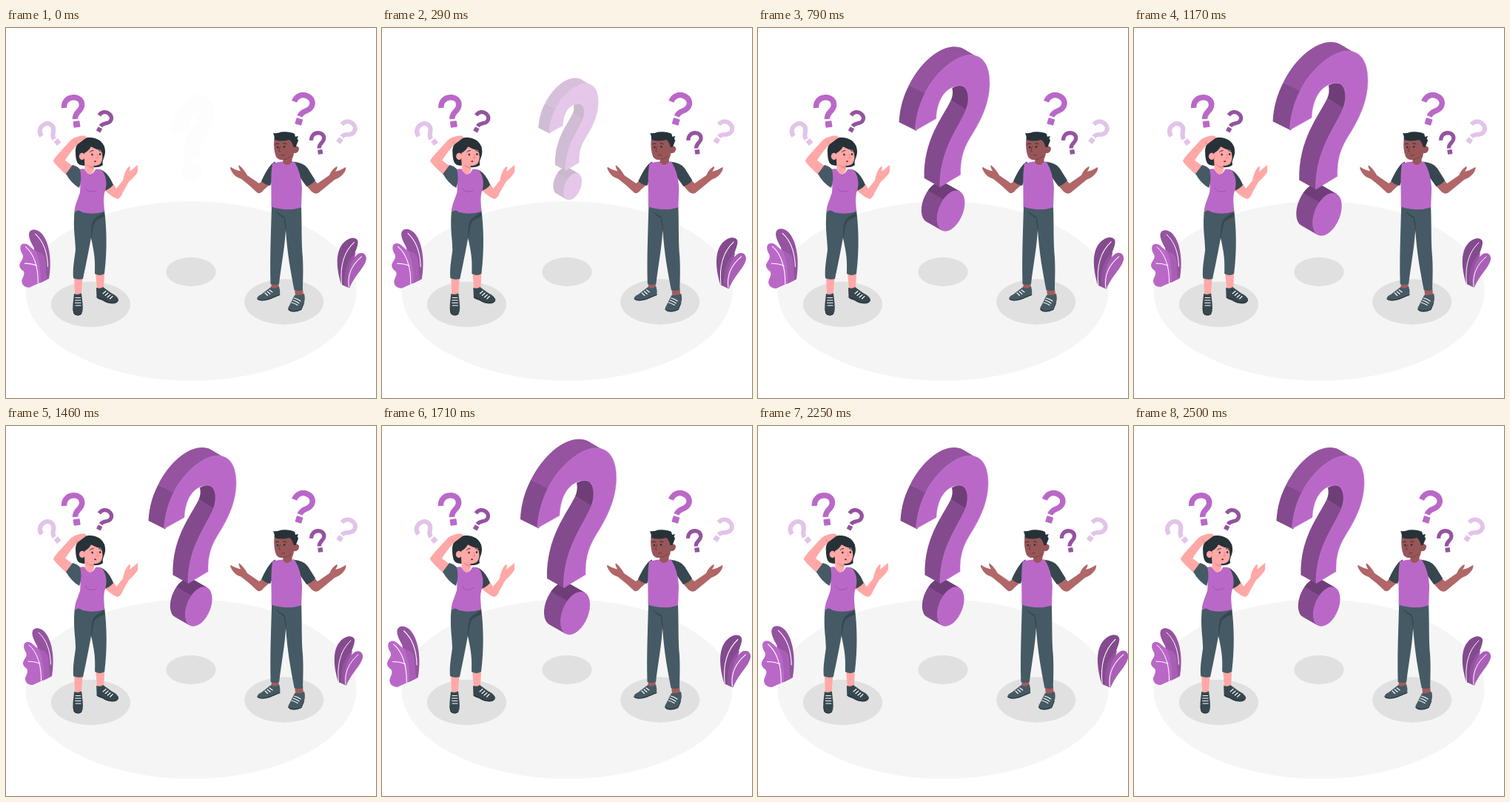
An HTML page that plays this animation: 500x500 px, repeating every 2540 ms.

```html
<!DOCTYPE html>
<html lang="en">
<head>
<meta charset="utf-8">
<title>Two people wondering</title>
<style>
html, body { margin: 0; width: 100%; height: 100%; overflow: hidden; background: #fff; }
svg { display: block; width: 100vw; height: 100vh; }
.lace { fill: none; stroke: #fff; stroke-width: 1.1; stroke-linecap: round; }
.vein { fill: none; stroke: #fff; stroke-width: 1; stroke-linecap: round; }
.ink { fill: none; stroke: #263238; stroke-width: 1; stroke-linecap: round; }
</style>
</head>
<body>
<svg viewBox="0 0 500 500">
<defs>
  <g id="ask">
    <path d="M-12.5-4C-13-13-7-18 0-18.2C7-18.5 12-14 11.5-7.5C11 1 2 1 2.5 11" fill="none" stroke="currentColor" stroke-width="7.5"/>
    <rect x="-4.5" y="-4.3" width="9" height="8.6" rx=".8" transform="translate(4.5 18) rotate(-8)" fill="currentColor"/>
  </g>
</defs>

<ellipse cx="250" cy="355.5" rx="223.5" ry="121.3" fill="#f5f5f5"/>
<g fill="#e0e0e0">
  <ellipse cx="250" cy="329.5" rx="33.7" ry="19.5"/>
  <ellipse cx="114.5" cy="373.5" rx="53.5" ry="30.7"/>
  <ellipse cx="375.7" cy="370" rx="53.5" ry="30.7"/>
</g>

<g id="plants">
  <path fill="#9553a0" d="M62 338C66 315 63 290 52 278C46 272 38 272 36 277C34 282 38 290 42 297L50 344Z"/>
  <path fill="#ba68c8" d="M36 350C29 350 26 346 26 341C27 336 31 332 28 328C24 325 22 322 23.500 318C26 313 29 311 27 306C23 300 23 293 28 292C34 291 37 296 42 300C48 304 52 302 56 309C59 317 57 330 60 339Z"/>
  <path fill="#9553a0" opacity=".5" d="M45 302C50 303 53 303 56 309C59 317 57 330 60 339L51 343.500Q52 320 45 302Z"/>
  <path class="vein" d="M31 296C42 305 48 323 47.500 344M30 318Q39 318 46 321M44 279C55 289 60 304 60.500 322"/>
  <path fill="#844a8e" d="M449 346C441 320 441 295 458 286C466 282 472 286 471 291C470 302 460 313 457 349Z"/>
  <path fill="#9553a0" d="M453 347.500C452 325 459 310 468 304L462 330L458 350Z"/>
  <path fill="#a95fb6" d="M458 350C456 330 461 312 472 305C479 302 483 308 482 313C479 325 468 332 460 350.500Z"/>
  <path class="vein" d="M466 290C452 303 447 322 449.500 346M476 309C464 319 457 333 459 349"/>
</g>

<g id="big">
  <g transform="matrix(20 -11.500 0 26.800 261 252.700)">
    <path fill="#844a8e" d="M.649-.761L-.451-1.699A1 1 0 0 0-1.749-.177L-.649.761Z"/>
    <path fill="#6f3e78" d="M.649-.761L-.451-1.699A1 1 0 0 0-1.630-1.786L-.53-.848L0 0Z"/>
    <circle r="1" fill="#ba68c8"/>
  </g>
  <path fill="#844a8e" d="M187 126C188 106 193 89 201.500 72.500L226 85L212 138.500Z"/>
  <path fill="#9553a0" d="M201.500 72.500C217 42 243 18 266 18Q274 18 279 21L301 34L260 60L224 85Z"/>
  <path fill="#844a8e" d="M261 95C249 120 222 150 223 206L245.500 218.500L262 180L284 108Z"/>
  <path fill="#6f3e78" d="M261 95Q265 87 263 77Q274 70 284 77Q291 88 283 108Z"/>
  <path fill="#ba68c8" stroke="#c682d2" stroke-width=".5" d="M210 138L240 121C241 97 251 75 274 73.500C286 74 289 92 283 108C272 135 245 165 245.500 218.500L275 201C274.500 182 277.500 167 287.500 150C300 130 316.500 103 316.500 70C316.500 45 307 30 289 30C270 30 240 52 224 85C216 101 211 119 210 138Z"/>
</g>

<g id="people">
  <g id="asks"></g>

  <!-- woman -->
  <g fill="#ffa8a7">
    <path d="M92 336L103.500 337L101.500 361L93 361Z"/>
    <path d="M121 330H133L132 353H123Z"/>
  </g>
  <g fill="#37474f">
    <path d="M92 359Q97 361 102 358.500L103.500 372Q105 386 100 388Q94 389.500 91.500 386Q89.500 378 91 368Z"/>
    <path d="M122 351Q128 353 131 350L142 358Q152 363 152 368Q150 373 143 372.500Q136 372 130 368Q123 366 122.500 364Z"/>
  </g>
  <path class="ink" d="M91 379Q91 386 94 387.500Q99 389 102 386.500M123 364Q130 366 134 369Q143 374 151 369"/>
  <path class="lace" d="M94 364.500H100.500M93.500 368H101M93.500 371.500H101M94 375H101M131 359L135 355.500M134 361.500L138 358M137 364L141 360.500M140.500 366L144 362.500"/>
  <path fill="#455a64" d="M93 244C90 270 94 285 94 300C92 315 90 325 91 338Q97 341 104 339C108 320 112 300 115 283C118 300 121 308 120 332Q127 336 133 332C137 300 136 270 133 246Z"/>
  <path fill="#37474f" d="M133 249Q119 256 117 262Q114 272 115.300 288Q117 268 120 262Q124 258 133 255Z"/>
  <path fill="#ffa8a7" d="M145 211L133 219Q145 230 151 231Q155 230 158 222L166 208Q176 199 178 194V185Q174 188 172 190L167 194L168 188Q166 185 161 195Q158 203 158 206L149 217Z"/>
  <path fill="#37474f" d="M126 191Q137 193 145 212Q140 218 133 220Z"/>
  <path fill="#ba68c8" d="M99 191Q103 190 106 190.500Q114 204 121 191Q127 190 131 194C136 202 137 213 133 223C131 233 133 240 133 248Q118 253 103 249Q97 244 93 249C92 240 98 230 100 222C101 213 100 205 99 191Z"/>
  <path d="M107 216Q111 223 118 221Q121 221 123 218" fill="none" stroke="#9553a0" stroke-width=".9"/>
  <path fill="#263238" d="M94 168C93 155 104 147 115 148C128 149 134 158 134 167C134 175 129 179 131 185Q126 189 117 188L112 185Q99 188 96 181Q94 176 94 168Z"/>
  <path fill="#ffa8a7" d="M106 177L106.500 191Q113 204 119 192L118 183Z"/>
  <path fill="#f28f8f" d="M108 183Q113 188 118.500 187V190Q111 190 108 183Z"/>
  <path fill="#ffa8a7" d="M106 169Q112 166 115 160Q122 165 130 165C131 173 131 180 127 184Q121 188 114 184.500L106 179Z"/>
  <ellipse cx="102.800" cy="173.500" rx="4" ry="4.700" fill="#ffa8a7"/>
  <path fill="#263238" d="M114 161Q119 159 124 161.500Q130 164 130.500 174Q134 168 133 160L123 153Z"/>
  <g fill="#263238"><ellipse cx="116.500" cy="171" rx="1.200" ry="1.600"/><ellipse cx="127" cy="170.500" rx="1.200" ry="1.600"/></g>
  <path class="ink" d="M113.500 167.500Q115 165.500 118 165.500M125.500 165.500Q128 165.500 129 167.500"/>
  <path d="M123 170L124.500 175.500L121.500 176" fill="none" stroke="#ed847e" stroke-width=".9"/>
  <ellipse cx="120.500" cy="180.300" rx="1.600" ry="1" fill="#7a3140"/>
  <path fill="#ffa8a7" d="M82 199C75 192 66 184 64 180C63 177 85 155 88 151Q97 145 106 145.500Q110 147 107 149.500L97 157C92 162 84 172 80 179L91 187Z"/>
  <path d="M97 157Q94 156 94 153" fill="none" stroke="#ed847e" stroke-width=".8"/>
  <path fill="#455a64" d="M90 185Q97 187 100 191Q103 205 99 216Q88 210 81 197Z"/>

  <!-- man -->
  <g fill="#a15c5e">
    <path d="M359 343H368.500V353H358Z"/><path d="M390 352H401L402 362H391Z"/>
  </g>
  <g fill="#455a64">
    <path d="M358 350Q363 354 369 349Q371 355 370 361L356 367Q344 370 340 367Q338 363 345 360Z"/>
    <path d="M390 361Q397 362 403 359Q405 367 402 373L399 381Q392 385 384 383Q379 380 383 375Z"/>
  </g>
  <path class="ink" d="M339.500 366Q345 370 356 366L370 360.500M381.500 380Q387 385 399 380.500L402.500 372"/>
  <path class="lace" d="M356 354L360 357M353 356L357 359.500M350 358L353.500 361.500M389.500 365Q394 366 398 369M388 368Q392 369 396 372M386 371Q390 372 394 374.500"/>
  <path fill="#455a64" d="M359 240Q380 247 399 241C400 270 399 290 401 310C402 330 401 345 401 354Q395 356 389.500 354C385 330 380 305 378 272C377 295 372 320 369 346Q363 348 357.500 346C356.500 310 358 280 359 240Z"/>
  <path fill="#37474f" d="M364 247Q370 252 376 255Q379 262 378.500 278L375.500 257Q369 254 364 247Z"/>
  <g fill="#b16668">
    <path d="M347 206L342 210L326 199Q321 190 315 185.500Q313 186 317 193.500Q308 191 304 188Q302 188 304 192Q308 201 318 204Q330 213 340 223Q345 224 348 219L357 211Z"/>
    <path d="M405 212L416 205L421 210L437 199Q440 191 447 187Q449 188 445 194Q453 192 459 188Q460 189 458 194Q453 202 444 205Q432 215 422 223Q417 225 413 221Z"/>
  </g>
  <path fill="#37474f" d="M364 180.500Q356 183 345 207Q350 212 357 213L362 200ZM388 180.500Q403 182 408 190L418 206Q413 212 406 214L396 200Z"/>
  <path fill="#ba68c8" d="M360 183Q368 180.500 374 180.500Q380 187 387 180.500L390 181Q399 196 400 216L399 242.500Q380 248.500 358.500 241.500C359 220 357 200 360 183Z"/>
  <path fill="#985658" d="M362.500 149Q375 153 386 150L389 160Q395 158 396 163Q395 170 389 169Q388 175 386.500 177V181Q379 189 374 181L374.500 178Q368 179 365 174Q361 165 362.500 149Z"/>
  <path d="M374.500 178Q381 177 385 173" fill="none" stroke="#7d4043" stroke-width=".9"/>
  <path fill="#263238" d="M361 142Q366 143 372 140.500Q383 139.500 390 143L391 147L395 146L393.500 149.500L395 152Q393 157 391.500 161L388.500 161Q387 154 383 151Q372 154 363 151Q363 146 361 142Z"/>
  <g fill="#263238"><ellipse cx="367" cy="161" rx="1.200" ry="1.500"/><ellipse cx="376" cy="160.500" rx="1.200" ry="1.500"/></g>
  <path class="ink" d="M364 157Q366 155.500 368.500 156.500M374.500 156Q377 155 379 157"/>
  <path d="M370.500 160L368.500 166.500L371 167.500M372 172.500Q374.500 170.500 377 172" fill="none" stroke="#6b3338" stroke-width=".9"/>
</g>
</svg>
<script>
const LOOP = 2540, LEAD = 30, LAST = 2494, BEAT = 1500;
const $ = id => document.getElementById(id);

// x, y, turn, scale, colour
const asks = [
  [91, 112, 0, 1, '#ba68c8'],
  [58.5, 143.6, -32, .82, '#e3c3e9'],
  [131.1, 125.5, 37, .7, '#9553a0'],
  [399.2, 108.3, 24.5, 1, '#ba68c8'],
  [421.5, 154.7, 0, .71, '#9553a0'],
  [458.5, 139.5, 45, .79, '#e3c3e9']
];
$('asks').innerHTML = asks.map(([x, y, a, s, c]) =>
  `<use href="#ask" color="${c}" transform="translate(${x} ${y}) rotate(${a}) scale(${s})"/>`).join('');

// Linear interpolation through [position, value] pairs
function track(keys, p) {
  for (let i = 1; i < keys.length; i++) {
    const [a, u] = keys[i - 1], [b, v] = keys[i];
    if (p <= b) return u + (v - u) * (p - a) / (b - a);
  }
  return keys[keys.length - 1][1];
}

const beatKeys = [[0, 1], [.1, 1.1], [.3, 1], [.4, 1], [.5, 1.1], [.6, 1], [1, 1]];
const shakeKeys = [0, -1, 2, -4, 4, -4, 4, -4, 2, -1, 0].map((v, i) => [i / 10, v]);

function bezier(x1, y1, x2, y2) {
  const at = (a, b, s) => 3 * s * (1 - s) ** 2 * a + 3 * s * s * (1 - s) * b + s ** 3;
  return x => {
    let lo = 0, hi = 1;
    for (let i = 0; i < 24; i++) {
      const mid = (lo + hi) / 2;
      if (at(x1, x2, mid) < x) lo = mid; else hi = mid;
    }
    return at(y1, y2, lo);
  };
}
const pop = bezier(.36, -.01, .5, 1.38);

const zoom = (id, x, y, s) =>
  $(id).setAttribute('transform', `translate(${x} ${y}) scale(${s}) translate(${-x} ${-y})`);

function draw(now) {
  const t = Math.min(now % LOOP + LEAD, LAST);
  const p = t % BEAT / BEAT;
  zoom('plants', 252.5, 311.5, track(beatKeys, p));
  $('people').setAttribute('transform', `translate(${track(shakeKeys, p) + .2} 0)`);

  const grow = t < 1000 ? pop(t / 1000) : 1;
  const size = t < 1000 ? .5 + grow / 2 : track(beatKeys, (t - 1000) / BEAT);
  zoom('big', 252, 150, size / 1.092);
  $('big').setAttribute('opacity', Math.max(0, Math.min(1, grow)));
}

const start = performance.now();
function tick() {
  draw(performance.now() - start);
  requestAnimationFrame(tick);
}
tick();
</script>
</body>
</html>
```
